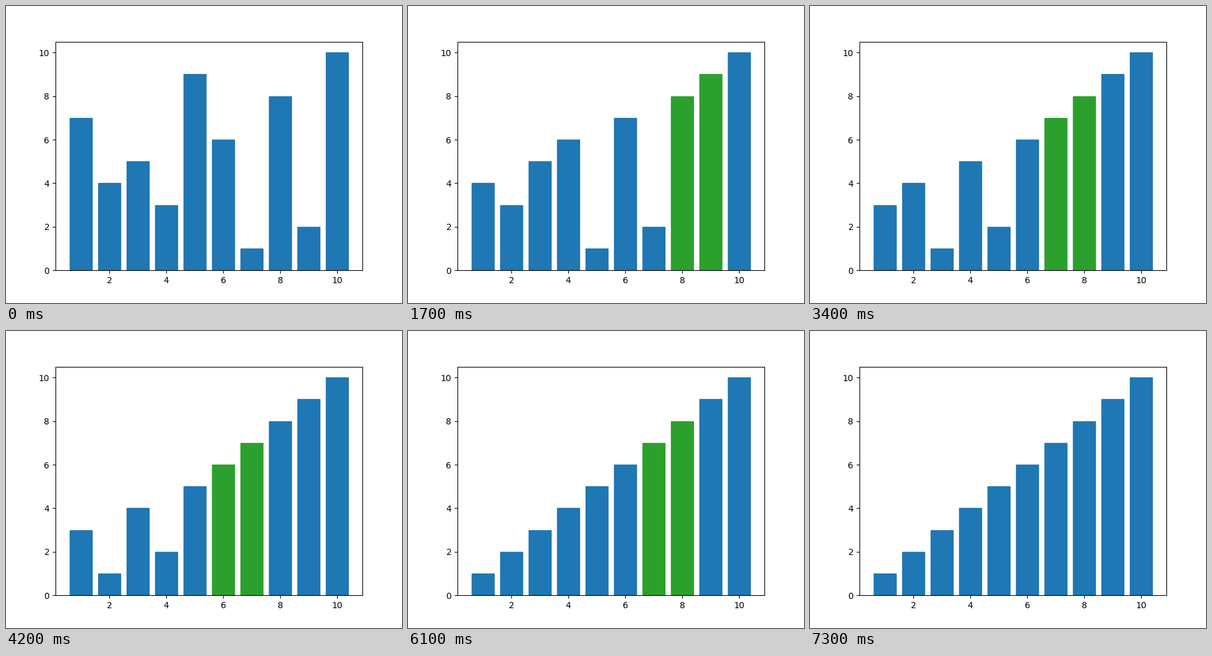
Recreate the animation shown at these times as a matplotlib script. Size 640 by 480 pixels, loop 7.4 s.

```python
import matplotlib.pyplot as plt
from matplotlib.animation import FuncAnimation

START = [7, 4, 5, 3, 9, 6, 1, 8, 2, 10]
IDLE, ACTIVE = "tab:blue", "tab:green"
STEP_MS = 100


def bubble_steps(values):
    """Return (values, compared pair) for every step of a bubble sort."""
    vals = list(values)
    steps = [(vals[:], ())]
    swapped = True
    while swapped:
        swapped = False
        for i in range(len(vals) - 1):
            if vals[i] > vals[i + 1]:
                vals[i], vals[i + 1] = vals[i + 1], vals[i]
                swapped = True
            steps.append((vals[:], (i, i + 1)))
    steps.append((vals[:], ()))
    return steps


steps = bubble_steps(START)

fig, ax = plt.subplots(figsize=(6.4, 4.8), dpi=100)
bars = ax.bar(range(1, len(START) + 1), START, color=IDLE)


def draw(frame):
    vals, pair = steps[frame]
    for i, (bar, val) in enumerate(zip(bars, vals)):
        bar.set_height(val)
        bar.set_color(ACTIVE if i in pair else IDLE)
    return list(bars)


def reset():
    return draw(0)


anim = FuncAnimation(fig, draw, frames=len(steps), init_func=reset,
                     interval=STEP_MS, repeat=True, repeat_delay=0, blit=False)
plt.show()
```
